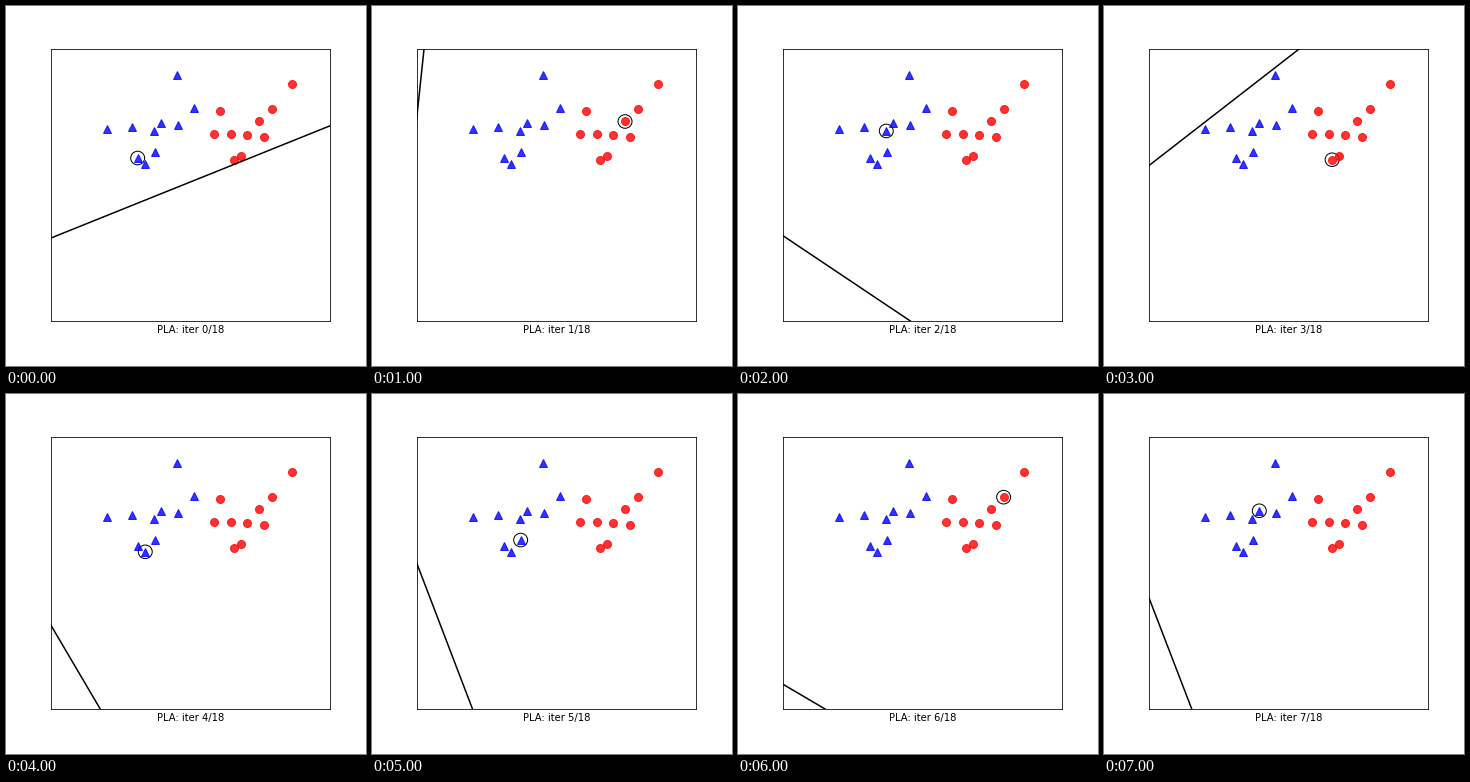
Write a matplotlib script that moves like this. It is 360 px wide and 360 px high and loops after 8 s.

```python
import numpy as np
import matplotlib.pyplot as plt
from matplotlib.animation import FuncAnimation

SIZE, DPI = 360, 72
COUNT, TOTAL = 10, 18
plt.rcParams["font.family"] = "DejaVu Sans"
plt.rcParams["font.size"] = 10

rng = np.random.RandomState(2)
# Covariance [[.3, .2], [.2, .3]]: long axis on the diagonal, short one across
SPREAD = np.array([[-np.sqrt(0.25), -np.sqrt(0.25)],
                   [-np.sqrt(0.05), np.sqrt(0.05)]])


def cluster(center):
    return center + rng.randn(COUNT, 2) @ SPREAD


blue, red = cluster([2, 2]), cluster([4, 2])
points = np.vstack([blue, red])
labels = np.repeat([1, -1], COUNT)

# Misclassified point chosen at each iteration
picks = [7, 10, 0, 18, 3, 6, 14, 9]

# Perceptron weights (bias, x, y) before each correction
weights = [rng.randn(3)]
for k in picks[:-1]:
    weights.append(weights[-1] + labels[k] * np.array([1, *points[k]]))

fig = plt.figure(figsize=(SIZE / DPI, SIZE / DPI), dpi=DPI, facecolor="white")
ax = fig.add_axes([0.125, 0.125, 0.775, 0.755])
ax.set(xlim=(0, 6), ylim=(-2, 4), xticks=[], yticks=[])

ax.plot(*blue.T, "b^", markersize=8, alpha=0.8)
ax.plot(*red.T, "ro", markersize=8, alpha=0.8)
line, = ax.plot([], [], "k", lw=1.5)
ring = ax.add_patch(plt.Circle((0, 0), 0.15, color="k", fill=False, lw=1))
caption = ax.set_xlabel("")


def draw(i):
    bias, wx, wy = weights[i]
    x = np.array([-100, 100])
    line.set_data(x, -(bias + wx * x) / wy)
    ring.center = points[picks[i]]
    caption.set_text(f"PLA: iter {i}/{TOTAL}")
    return line, ring, caption


anim = FuncAnimation(fig, draw, frames=len(picks), interval=1000, repeat=True)
plt.show()
```
